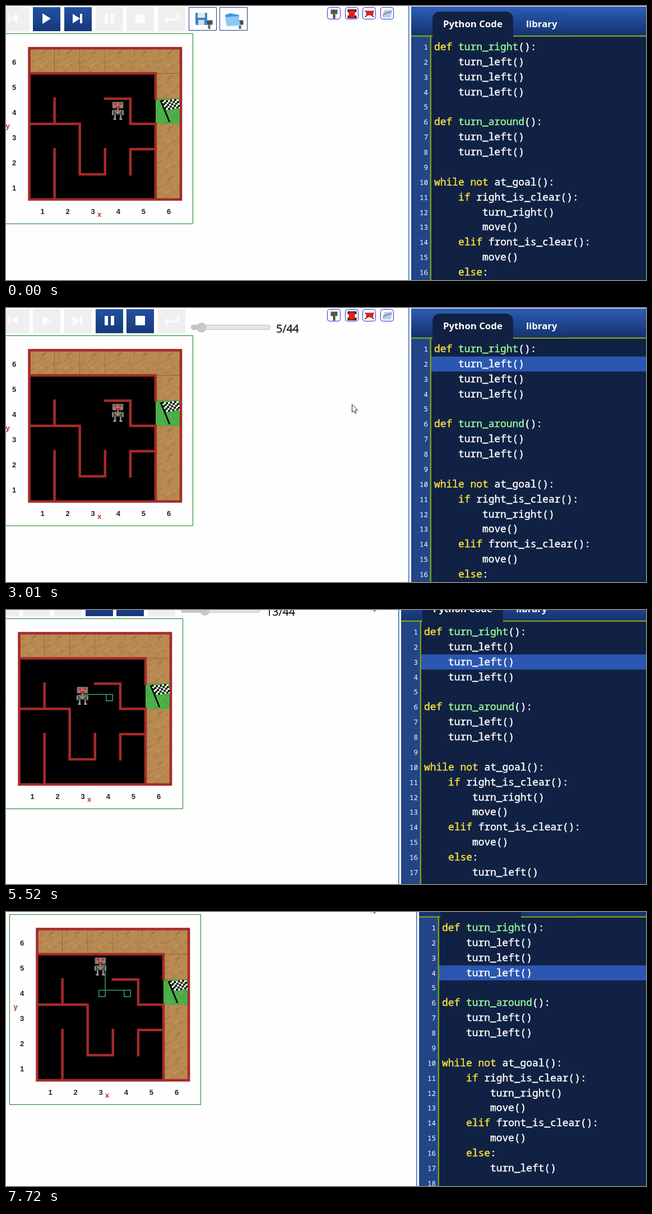
Recreate the animation shown at these times as an HTML page with a canvas. Size 1142 by 490 pixels, loop 8000 ms.

```html
<!DOCTYPE html>
<html lang="en">
<head>
<meta charset="utf-8">
<title>Robot in a maze</title>
<style>
html, body { margin: 0; width: 100%; height: 100%; overflow: hidden; background: #fefefe; }
canvas { display: block; }
</style>
</head>
<body>
<canvas id="stage" width="1142" height="490"></canvas>
<script>
const LOOP = 8000, W = 1142, H = 490;
const g = document.getElementById('stage').getContext('2d');
const MONO = '"Noto Sans Mono", monospace', SANS = '"Open Sans", sans-serif';

const CODE = `def turn_right():
    turn_left()
    turn_left()
    turn_left()

def turn_around():
    turn_left()
    turn_left()

while not at_goal():
    if right_is_clear():
        turn_right()
        move()
    elif front_is_clear():
        move()
    else:
        turn_left()
`.split('\n');

// Playback: two definitions, then the same pass through the loop again and again
const FIRST_STEP = 1200, STEP = 310;
const PASS = [10, 11, 12, 2, 3, 4, 13];
const codeLine = step => step < 2 ? 1 + step * 5 : PASS[(step - 2) % PASS.length];

// Key points: time, x, y
const CAMERA = [[4310, 0, 0], [4390, -4, -1], [4620, -4, -1], [5060, -22, -15], [5520, -18, -34],
  [5850, -18, -34], [5990, 23, -35], [6580, 23, -35], [7720, 14, -45]];
const POINTER = [[80, 701, 382], [850, 87, 30], [1820, 87, 30], [2700, 617, 172], [3010, 617, 172], [3440, 651, -14]];

function along(keys, t) {
  const next = keys.findIndex(k => k[0] >= t);
  const i = next < 0 ? keys.length - 1 : Math.max(1, next);
  const [a, b] = [keys[i - 1], keys[i]];
  const f = Math.min(1, Math.max(0, (t - a[0]) / (b[0] - a[0])));
  return [1, 2].map(k => Math.round(a[k] + (b[k] - a[k]) * f));
}

function at(x, y, draw) {
  g.save();
  g.translate(x, y);
  draw();
  g.restore();
}
function box(color, x, y, w, h, radius = 0) {
  g.fillStyle = color;
  g.beginPath();
  g.roundRect(x, y, w, h, radius);
  g.fill();
}
function shape(color, path) {
  g.fillStyle = color;
  g.fill(new Path2D(path));
}
function line(color, width, path) {
  g.strokeStyle = color;
  g.lineWidth = width;
  g.stroke(new Path2D(path));
}
function frame(color, x, y, w, h, radius = 0) {
  g.strokeStyle = color;
  g.lineWidth = 1;
  g.beginPath();
  g.roundRect(x, y, w, h, radius);
  g.stroke();
}
function text(string, x, y, color, font, align = 'left', extraWeight = 0) {
  g.fillStyle = g.strokeStyle = color;
  g.font = font;
  g.textAlign = align;
  g.fillText(string, x, y);
  if (!extraWeight) return;
  g.lineWidth = extraWeight;
  g.strokeText(string, x, y);
}
function shade(y0, y1, from, to) {
  const fill = g.createLinearGradient(0, y0, 0, y1);
  fill.addColorStop(0, from);
  fill.addColorStop(1, to);
  return fill;
}

// Maze: the wall path is written in cells, from the top left corner
const CELL = 45.1, LEFT = 41.5, TOP = 75.5;
const WALLS = 'M0 0H6V6H0Z M0 1H5V2 M5 3V6 M1 2V3 M0 3H2V5H3V4 M3 2H4V3H5 M1 4V6 M4 5V4H5';

function ground(column, row, base, tones, count, length) {
  let seed = 77;
  const random = () => (seed = seed * 16807 % 2147483647) / 2147483647;
  at(LEFT + column * CELL, TOP + row * CELL, () => {
    box(base, 0, 0, CELL, CELL);
    g.globalAlpha = 0.28;
    for (let i = 0; i < count; i++) {
      const size = length * (0.4 + random());
      const x = random() * (CELL - size), y = size + random() * (CELL - size);
      line(tones[i % tones.length], 1 + random() * 2.5, `M${x} ${y}l${size} ${-size * 0.7}`);
    }
  });
}

function drawFlag() {
  at(LEFT + 5 * CELL, TOP + 2 * CELL, () => {
    for (let i = 0; i < 8; i++) for (let j = 0; j < 5; j++) {
      const wave = 2 + Math.sin(i * 0.8) * 1.2;
      box((i + j) % 2 ? '#fff' : '#000', 11 + i * 3.7 + j, wave + j * 3.3, 3.8, 3.4);
    }
    line('#000', 2.8, 'M9 3L25 42');
  });
}

function drawMaze() {
  frame('#128020', -7.5, 49.5, 341, 340);
  box('#000', LEFT, TOP, 6 * CELL, 6 * CELL);
  for (let i = 0; i < 11; i++) {
    ground(Math.min(i, 5), Math.max(0, i - 5), '#b88951', ['#94683a', '#cba064'], 34, 7);
  }
  ground(5, 2, '#4cae48', ['#2e8a35', '#7ccc6c'], 80, 2);
  drawFlag();
  at(LEFT, TOP, () => {
    g.scale(CELL, CELL);
    g.lineCap = 'square';
    line('#a52a2a', 4.5 / CELL, WALLS);
  });
  const label = (string, x, y, color = '#222') =>
    text(string, x, y, color, 'bold 13px "Liberation Sans", sans-serif', 'center');
  for (let i = 0; i < 6; i++) {
    label(i + 1, 65 + i * CELL, 372);
    label(i + 1, 14.5, 330 - i * CELL);
  }
  label('x', 166.5, 377, '#b03030');
  label('y', 3, 219, '#b03030');
}

// Quarter turns to the left: 0 east, 1 north, 2 west, 3 south
function walk(step) {
  let x = 199.5, y = 188.3, dir = 3, trail = 'M';
  const mark = () => {
    const angle = (dir + 2.5) * Math.PI / 2;
    trail += `${x + 3 + Math.cos(angle) * 8} ${y + 2.3 - Math.sin(angle) * 8} `;
  };
  mark();
  for (let i = 0; i < step; i++) {
    const current = codeLine(i);
    if (current >= 2 && current <= 4) dir = (dir + 1) % 4;
    if (current === 13) {
      x += Math.cos(dir * Math.PI / 2) * CELL;
      y -= Math.sin(dir * Math.PI / 2) * CELL;
    }
    mark();
  }
  return { x, y, dir, trail };
}

function drawRobot({ x, y, dir }) {
  const gray = '#868688', dark = '#555558', red = '#e02020';
  at(x, y, () => {
    if (dir % 2 === 0) {
      if (dir === 0) g.scale(-1, 1);
      box(dark, -8, -17, 19, 15, 2);
      box('#a0a0a0', -7, -16, 16, 12, 1);
      line('#222', 3, 'M2 -9.5h3 M-1 2.5h5');
      line(red, 3, 'M-12 -13.5h3 M-12 -6.5h3');
      line(gray, 2.5, 'M-2 0H6V5H-2Z');
      line('#b0b0b0', 3, 'M1.5 8V13.5H-5');
      return;
    }
    const front = dir === 3;
    box(dark, -10, -17, 20, 12, 1);
    box(gray, -9, -16, 18, 10, 1);
    if (front) line(red, 3.5, 'M-7 -13h5 M2 -13h5 M-4 -7.5h8');
    line(dark, 9, 'M-7 1.5H7');
    line(gray, 3, 'M0 -5V3 M-9 -2v9 M9 -2v9 M-5 6v8 M5 6v8');
    line('#c4a838', 1.3, front ? 'M-6 -2L0 4L6 -2' : 'M-6 4L0 -2L6 4');
    line('#a8a8a8', 2.5, 'M-8 14h5 M3 14h5');
  });
}

const ICONS = [
  'M11 14h3v16h-3z M28 14v16l-13 -8z',
  'M17 13v19l15 -9.5z',
  'M15 14v17l13 -8.5z M28 14h4v17h-4z',
  'M16 14h6v17h-6z M27 14h6v17h-6z',
  'M16 14h17v17h-17z',
  'M10 24l9 -7v5h15v-9h4v13h-19v5z'
];

function drawSaveButtons() {
  for (const x of [326.5, 381.5]) {
    frame('#1d3c80', x, 2.5, 49, 41);
    line('#4a4a4c', 8, `M${x + 30} 29.5h12`);
    line('#666', 4, `M${x + 36} 33v8`);
  }
  box('#3f84c4', 338, 12, 21, 22, 2);
  box('#dce9f4', 342, 12, 13, 9);
  box('#c8dcec', 343, 25, 11, 9);
  shape('#3f97dc', 'M391 16l9 -3l16 3l-2 19h-20z');
  shape('#8cc8f4', 'M391 20l23 -2l5 17l-25 1z');
}

function drawToolbar(step) {
  const active = step < 0 ? [1, 2] : [3, 4];
  ICONS.forEach((icon, i) => at(Math.round(i * 55.7 - 7.5), 0, () => {
    const on = active.includes(i);
    box(on ? shade(2, 45, '#2450a2', '#16387a') : '#efefef', 0, 2, 49, 43);
    shape(on ? '#fff' : '#fbfbfb', icon);
  }));
  if (step < 0) return drawSaveButtons();
  const knob = 333.6 + 3.02 * step;
  box('#e4e4e4', 330, 30, 142, 9, 4.5);
  box('#c6c6c6', 330, 30, knob - 330, 9, 4.5);
  frame('#c0c0c0', 330.5, 30.5, 141, 8, 4);
  box('#c8c8c8', knob - 9, 26, 18, 18, 9);
  text(step + '/44', 482, 44, '#111', '19.6px ' + SANS, 'left', 0.3);
}

function drawViewButtons() {
  const pictures = [
    () => { line('#555', 8, 'M6 8h12'); line('#444', 4, 'M12 12v8'); },
    () => { line('#222', 5, 'M4 6h16 M4 17h16'); box('#e81c1c', 6, 5, 11, 13, 1); },
    () => { line('#444', 2, 'M4 17L20 6 M4 6L20 17'); box('#e81c1c', 6, 6, 13, 8, 1); },
    () => { shape('#a8d4f0', 'M6 5l15 -1l-3 14h-15z'); line('#e04040', 1.5, 'M4 14l6 -4l9 -2'); }
  ];
  pictures.forEach((picture, i) => at(573.5 + Math.round(i * 31.7), 2.5, () => {
    frame('#2a2ae0', 0, 0, 23, 21, 4);
    picture();
  }));
}

function drawEditor(step) {
  const bg = '#112143', green = '#7b9c1c', pitch = 26.87, tab = [13, 13, 0, 0];
  box('#3566ac', 718, 0, 1.5, 560);
  box(bg, 723, 1, 480, 560);
  box(shade(1, 53, '#2e5db8', '#14316c'), 723, 1, 480, 52);
  box('#224587', 723, 55, 34, 500);
  box(green, 723, 52.5, 480, 2.5);
  box(green, 756.5, 53, 2.5, 500);
  box(bg, 761, 10, 144, 46, tab);
  box(shade(10, 52, '#2654a8', '#15346f'), 909, 10, 94, 42.5, tab);
  text('Python Code', 780, 37.5, '#fff', 'bold 16.8px ' + SANS);
  text('library', 928, 37.5, '#fff', 'bold 16.8px ' + SANS);
  if (step >= 0) box('#2b57b2', 759, 59.8 + (codeLine(step) - 1) * pitch, 444, pitch);
  CODE.forEach((source, i) => {
    const y = 79 + i * pitch;
    text(i + 1, 753, y - 1, '#fff', '12.5px ' + MONO, 'right');
    for (const { 0: word, index } of source.matchAll(/\w+|[^\w\s]+/g)) {
      const keyword = /^(def|while|not|if|elif|else)$/.test(word);
      const defined = source.startsWith('def') && index === 4;
      const color = keyword ? '#f8e23c' : defined ? '#98fb98' : '#fff';
      text(word, 764 + index * 10.74, y, color, '17.9px ' + MONO, 'left', 0.45);
    }
  });
}

function drawPointer(x, y) {
  at(x + 0.5, y + 0.5, () => {
    const arrow = 'M0 0V14L3 11L5.5 16L7.5 15L5.5 10.5H10Z';
    shape('#fff', arrow);
    line('#222', 1, arrow);
  });
}

function render(t) {
  const step = Math.floor((t - FIRST_STEP) / STEP);
  box('#fefefe', 0, 0, W, H);
  at(...along(CAMERA, t), () => {
    const robot = walk(step);
    drawMaze();
    line('#2e8b57', 1.8, robot.trail);
    drawRobot(robot);
    drawToolbar(step);
    drawViewButtons();
    drawEditor(step);
  });
  if (t >= 80) drawPointer(...along(POINTER, t));
}

const start = performance.now();
function tick() {
  render((performance.now() - start) % LOOP);
  requestAnimationFrame(tick);
}
tick();
</script>
</body>
</html>
```
